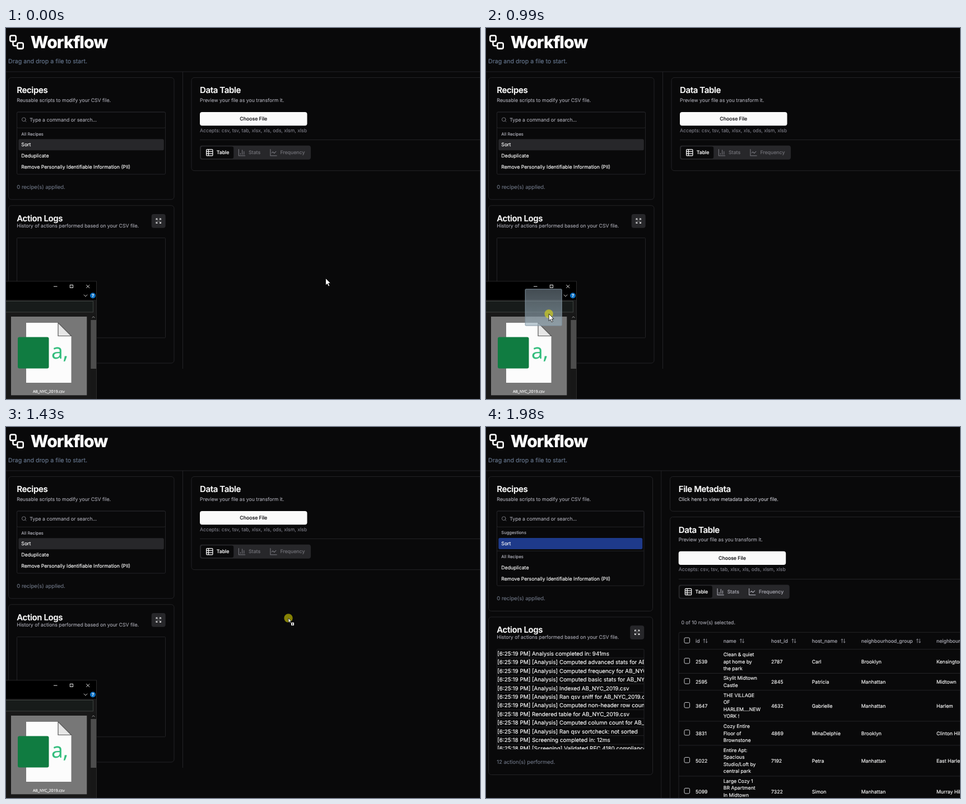
An HTML page for the animation above (2.69 s loop, 846 px wide and 662 px high).

```html
<!DOCTYPE html>
<html lang="en">
<head>
<meta charset="utf-8">
<title>Workflow</title>
<style>
html, body { margin: 0; width: 100%; height: 100%; overflow: hidden; background: #09090a; }
#stage { display: block; width: 846px; height: 662px; font-family: Inter, sans-serif; text-rendering: geometricPrecision; }
text { white-space: pre; stroke-width: .16px; }
</style>
</head>
<body>
<svg id="stage" viewBox="0 0 846 662"></svg>
<script>
const LOOP = 2690;
const LINE = '#232326', MUTED = '#a1a1aa', GRAY = '#6b7280', WHITE = '#fafafa', PANEL = '#27272a', BG = '#09090a';
const DIM = '#6c6c72', INK = '#18181b', SMALL = 8.71;

// Drawing helpers
const text = (x, y, s, size = SMALL, fill = WHITE, weight = 400, extra = '') =>
  `<text x="${x}" y="${y}" font-size="${size}" fill="${fill}" stroke="${fill}" font-weight="${weight}" ${extra}>${s}</text>`;
const title = (x, y, s) => text(x, y, s, 15, WHITE, 600, 'letter-spacing="-.375"');
const box = (x, y, right, bottom, r = 0, fill = 'none', stroke = 'none') =>
  `<rect x="${x}" y="${y}" width="${right - x}" height="${bottom - y}" rx="${r}" fill="${fill}" stroke="${stroke}"/>`;
const card = (x, y, right, bottom, r = 5) => box(x, y, right, bottom, r, 'none', LINE);
const path = (d, stroke = LINE, width = 1, fill = 'none') =>
  `<path d="${d}" stroke="${stroke}" stroke-width="${width}" fill="${fill}"/>`;
const hLine = (x, y, right) => path(`M${x} ${y}H${right}`);
const icon = (d, cx, cy, size, color) =>
  `<path d="${d}" transform="translate(${cx} ${cy}) scale(${size / 24}) translate(-12 -12)" fill="none" stroke="${color}"
    stroke-width="2" stroke-linecap="round" stroke-linejoin="round"/>`;
const group = (id, body) => `<g id="${id}">${body}</g>`;

const ICON = {
  flow: 'M5 3H9A2 2 0 0 1 11 5V9A2 2 0 0 1 9 11H5A2 2 0 0 1 3 9V5A2 2 0 0 1 5 3ZM7 11v4a2 2 0 0 0 2 2h4M15 13h4a2 2 0 0 1 2 2v4a2 2 0 0 1-2 2h-4a2 2 0 0 1-2-2v-4a2 2 0 0 1 2-2Z',
  table: 'M5 3h14a2 2 0 0 1 2 2v14a2 2 0 0 1-2 2H5a2 2 0 0 1-2-2V5a2 2 0 0 1 2-2ZM9 3v18M3 9h18M3 15h18',
  stats: 'M3 3v18h18M18 17V9M13 17V5M8 17v-3',
  freq: 'M3 3v18h18M19 9l-5 5-4-4-3 3',
  expand: 'M21 21l-6-6m6 6v-5m0 5h-5M3 16v5h5M3 21l6-6M21 8V3h-5M21 3l-6 6M3 8V3h5M3 3l6 6',
  search: 'M19 11A8 8 0 1 1 3 11A8 8 0 1 1 19 11M21 21l-4.3-4.3',
  sort: 'M21 16l-4 4-4-4M17 20V4M3 8l4-4 4 4M7 4v16',
  spin: 'M21 12a9 9 0 1 1-6.219-8.56'
};

const LOGS = [
  '[6:25:19 PM] Analysis completed in: 941ms',
  '[6:25:19 PM] [Analysis] Computed advanced stats for AB_NYC_2019.csv',
  '[6:25:19 PM] [Analysis] Computed frequency for AB_NYC_2019.csv',
  '[6:25:19 PM] [Analysis] Computed basic stats for AB_NYC_2019.csv',
  '[6:25:19 PM] [Analysis] Indexed AB_NYC_2019.csv',
  '[6:25:19 PM] [Analysis] Ran qsv sniff for AB_NYC_2019.csv',
  '[6:25:19 PM] [Analysis] Computed non-header row count for AB_NYC_2019.csv',
  '[6:25:18 PM] Rendered table for AB_NYC_2019.csv',
  '[6:25:18 PM] [Analysis] Computed column count for AB_NYC_2019.csv',
  '[6:25:18 PM] [Analysis] Ran qsv sortcheck: not sorted',
  '[6:25:18 PM] Screening completed in: 12ms',
  '[6:25:18 PM] [Screening] Validated RFC 4180 compliance'
];

const logRows = count => LOGS.slice(-count).map((s, i) =>
  text(.7, 11.4 + i * 15.4, s, 9.9, '#fff') + hLine(0, 15.4 * (i + 1), 270)).join('');
const logView = (id, y, width, height, count) =>
  `<svg id="${id}" x="19.5" y="${y}" width="${width}" height="${height}" overflow="hidden">${logRows(count)}</svg>`;

const search = right => card(19.5, 150, right, 178.3, 2) + icon(ICON.search, 32.2, 163.6, 10, '#8b8b92') +
  text(42.3, 167, 'Type a command or search...', SMALL, MUTED);

function tabs(x, y, dim, loading) {
  const grow = loading ? 20 : 0, mid = y + 12.5, base = y + 15.6;
  const frequency = x + 131.5 + 2 * grow;
  const tab = (symbol, left, gap, name, color) =>
    icon(symbol, left, mid, 15, color) + text(left + gap, base, name, SMALL, color, 500);
  return box(x, y, x + 198 + 3 * grow, y + 25, 4, PANEL) + box(x + 2, y + 1.8, x + 60.2 + grow, y + 23.2, 3, BG) +
    tab(ICON.table, x + 17.3, 12.4, 'Table', WHITE) +
    tab(ICON.stats, x + 75 + grow, 12, 'Stats', dim) +
    tab(ICON.freq, frequency, 11.9, 'Frequency', dim);
}

const chooser = (x, y, opacity = 1) =>
  `<g opacity="${opacity}">${box(x, y, x + 191.5, y + 24.3, 4, WHITE)}</g>` +
  text(x + 95.8, y + 15, 'Choose File', SMALL, INK, 500, 'text-anchor="middle"') +
  text(x, y + 35.5, 'Accepts: csv, tsv, tab, xlsx, xls, ods, xlsm, xlsb', SMALL, '#777780');

const dataHead = (x, y) => title(x, y, 'Data Table') +
  text(x, y + 15.4, 'Preview your file as you transform it.', SMALL, MUTED);

function logCard(right, top, bottom) {
  return card(4.5, top, right, bottom) + title(19.3, top + 28, 'Action Logs') +
    text(19.3, top + 39.2, 'History of actions performed based on your CSV file.', SMALL, MUTED) +
    box(right - 40.3, top + 15.2, right - 15.3, top + 40, 4, PANEL) +
    icon(ICON.expand, right - 27.8, top + 27.4, 11, WHITE) +
    card(19.5, top + 57.7, right - 15.5, top + 236, 1);
}

const header = icon(ICON.flow, 19, 25.2, 31.2, '#fff') +
  text(43.8, 35.8, 'Workflow', 30, '#fff', 800, 'letter-spacing="-.9"') +
  text(4, 63, 'Drag and drop a file to start.', 10.65, '#64748b') + hLine(0, 78, 846) +
  title(19.3, 116.4, 'Recipes') + text(19.3, 131.7, 'Reusable scripts to modify your CSV file.', SMALL, MUTED);

const spinner = (x, color) =>
  `<g transform="translate(${x} 222.3)"><g class="spin">${icon(ICON.spin, 0, 0, 15, color)}</g></g>`;

const before = path('M315.5 78V608') + card(4.5, 88.5, 300, 306) + card(19.5, 150, 284.5, 261, 2) + search(284.5) +
  text(27.3, 192, 'All Recipes', 7.5, MUTED, 500) + box(22.3, 198.2, 281.8, 218.3, 2.5, PANEL) +
  text(27.3, 211.3, 'Sort') + text(27.3, 231.2, 'Deduplicate') +
  text(27.3, 251, 'Remove Personally Identifiable Information (PII)') +
  text(19.3, 287, '0 recipe(s) applied.', 9.45, GRAY) + logCard(300, 316.8, 598) +
  card(331, 88.5, 860, 254.6) + dataHead(346, 116.4) + hLine(346, 199.5, 846) +
  group('idle', chooser(346, 150) + tabs(346, 209.8, DIM, false)) +
  group('loading', chooser(346, 150, .5) + tabs(346, 209.8, DIM, true) +
    spinner(411, WHITE) + spinner(487, '#85858b') + spinner(586.5, '#85858b') +
    [2, 3, 5].map(n => logView('log' + n, 374.5, 265, 178, n)).join(''));

const ROWS = [
  [418.5, 439.5, 2539, 'Clean &amp; quiet|apt home by|the park', 2787, 'Carl', 'Brooklyn', 'Kensington'],
  [454.7, 469.8, 2595, 'Skylit Midtown|Castle', 2845, 'Patricia', 'Manhattan', 'Midtown'],
  [497.5, 525, 3647, 'THE VILLAGE|OF|HARLEM....NEW|YORK !', 4632, 'Gabrielle', 'Manhattan', 'Harlem'],
  [546.5, 568, 3831, 'Cozy Entire|Floor of|Brownstone', 4869, 'MinaDelphie', 'Brooklyn', 'Clinton Hill'],
  [595.5, 623, 5022, 'Entire Apt:|Spacious|Studio/Loft by|central park', 7192, 'Petra', 'Manhattan', 'East Harlem'],
  [650.5, 678, 5099, 'Large Cozy 1|BR Apartment|In Midtown|East', 7322, 'Simon', 'Manhattan', 'Murray Hill']
];
const COLS = [['id', 374, 391.5], ['name', 423.7, 457], ['host_id', 509, 549.5], ['host_name', 581.7, 637.5],
  ['neighbourhood_group', 669.7, 772], ['neighbourhood', 804, 870]];

const check = y => box(354, y - 5, 363.5, y + 4.5, 2, 'none', '#c9c9cc');
function table() {
  let out = card(344, 366.3, 860, 700, 3) + hLine(344, 396.6, 846) + check(381);
  for (const [name, x, arrow] of COLS)
    out += text(x, 385, name, 8.7, MUTED, 500) + icon(ICON.sort, arrow, 381.6, 10, MUTED);
  for (const [mid, bottom, id, name, ...rest] of ROWS) {
    const lines = name.split('|');
    out += check(mid - 1) + hLine(344, bottom, 846) + text(374, mid + 3, id);
    lines.forEach((s, i) => out += text(423.7, mid + 3 + (i - (lines.length - 1) / 2) * 12.5, s));
    rest.forEach((s, i) => out += text(COLS[i + 2][1], mid + 3, s));
  }
  return out;
}

const after = path('M312.7 78V662') + card(4.5, 88.5, 297.5, 328.5) + card(19.5, 150, 282, 283.2, 2) + search(282) +
  text(27.3, 191.3, 'Suggestions', 7.5, MUTED, 500) + box(22.3, 198, 279.2, 218, 2.5, '#1e3a8a') +
  text(27.3, 211, 'Sort') + hLine(20, 221.2, 282) + text(27.3, 234.2, 'All Recipes', 7.5, MUTED, 500) +
  text(27.3, 253.8, 'Deduplicate') + text(27.3, 273.5, 'Remove Personally Identifiable Information (PII)') +
  text(19.3, 309.4, '0 recipe(s) applied.', 9.45, GRAY) + logCard(297.5, 339, 620.5) +
  logView('logAll', 396.7, 262.5, 178.3, 12) + text(19.3, 601.3, '12 action(s) performed.', 9.45, GRAY) +
  card(328.5, 88.5, 860, 150.3) + title(343.7, 116.4, 'File Metadata') +
  text(343.7, 131.7, 'Click here to view metadata about your file.', SMALL, '#bdbdc4') +
  card(328.5, 160.5, 860, 700) + dataHead(343.7, 188.5) + chooser(343.7, 221.8) +
  hLine(344, 271.5, 846) + tabs(343.7, 281.5, MUTED, false) +
  text(348.4, 352.2, '0 of 10 row(s) selected.', SMALL, MUTED) + table();

const explorer = box(-2, 452, 161.5, 664, 0, '#191919', '#2b2b2b') + box(0, 452.5, 161, 485, 0, '#000') +
  path('M85 461.2H91.5M143.3 458.3l5.8 5.8m0-5.8l-5.8 5.8', '#ddd') + box(114.3, 458.5, 119.5, 463.5, 0, 'none', '#ddd') +
  path('M138.7 475.8l3.3 3.3 3.3-3.3', '#ccc') + '<circle cx="155" cy="477.5" r="5" fill="#0b6fc2"/>' +
  text(155, 480.2, '?', 7.5, '#fff', 700, 'text-anchor="middle"') +
  box(-2, 487.5, 155.5, 507, 0, '#171b1a', '#3c413f') + box(151, 510, 161, 662, 0, '#171717') +
  box(151.3, 521, 161, 608, 0, '#4d4d4d') + path('M153.6 517.2l2.4-2.4 2.4 2.4', '#999') +
  box(9, 515, 144.3, 655.3, 0, '#777') + path('M36 526H93L116.5 549.5V633H36Z', 'none', 0, '#fcfcfc') +
  path('M93 526V549.5H116.5Z', '#585858', 1.2, '#e6e6e6') + box(21, 551.5, 76.5, 607.5, 3, '#107c41') +
  text(81, 589.8, 'a,', 37.5, '#33bd7d', 400, 'font-family="Open Sans, sans-serif"') +
  text(76.3, 651, 'AB_NYC_2019.csv', 7, '#fff', 400, 'font-family="Open Sans, sans-serif" text-anchor="middle"');

const ARROW = 'M0 0V12.6L2.9 9.9L5 14.6L7.2 13.6L5.1 9.1H9Z';
const pointer = group('ghost', box(-42, -44, 23, 21, 1, 'url(#glass)', '#8194a2')) +
  '<circle id="press" r="7.7" fill="#f8f000" opacity=".52"/>' +
  group('arrow', path(ARROW, '#000', .8, '#fff')) +
  group('drop', `<g transform="scale(.62)">${path(ARROW, '#111', 1.2, '#fff')}</g>` +
    box(5, 8, 10, 13, 0, '#fff') + path('M6.2 10.5h2.6M7.5 9.2v2.6', '#111'));

const stage = document.getElementById('stage');
stage.innerHTML = `<defs><linearGradient id="glass" x2="0" y2="1"><stop stop-color="#8799a6" stop-opacity=".5"/>
  <stop offset="1" stop-color="#9ab0bd" stop-opacity=".65"/></linearGradient></defs>` +
  header + group('before', before) + group('after', after) + group('explorer', explorer) + group('pointer', pointer);

// Pointer legs: start, end, from, to, x easing, y easing
const linear = p => p, inOut = p => p * p * (3 - 2 * p);
const slowIn = p => p ** 3, quickIn = p => p ** 1.4, softOut = p => 1 - (1 - p) ** 2, slowOut = p => 1 - (1 - p) ** 3;
const LEGS = [
  [30, 290, [570.5, 446.5], [46.5, 582], inOut, inOut],
  [425, 560, [46.5, 582], [56.5, 576], inOut, inOut],
  [740, 990, [56.5, 576], [111, 511], slowIn, slowIn],
  [990, 1080, [111, 511], [214, 424], linear, linear],
  [1080, 1260, [214, 424], [444, 345.5], linear, softOut],
  [1260, 1430, [444, 345.5], [504, 341], slowOut, slowOut],
  [1570, 1770, [504, 341], [758.5, 178], quickIn, quickIn],
  [1800, 1860, [758.5, 178], [880, 100], linear, linear]
];

function pointerAt(t) {
  const [start, end, a, b, ex, ey] = LEGS.filter(leg => leg[0] <= t).pop() || LEGS[0];
  const p = Math.min(1, Math.max(0, (t - start) / (end - start)));
  return [a[0] + (b[0] - a[0]) * ex(p), a[1] + (b[1] - a[1]) * ey(p)];
}

const parts = Object.fromEntries([...stage.querySelectorAll('[id]')].map(el => [el.id, el]));
const spinners = stage.querySelectorAll('.spin');
const show = (id, on) => parts[id].setAttribute('display', on ? 'inline' : 'none');

function draw(t) {
  const [x, y] = pointerAt(t);
  const held = t >= 740 && t < 1580, done = t >= 1980, loading = t >= 1670;
  const inWindow = x < 161 && y > 452, dragging = held && !inWindow;
  parts.pointer.setAttribute('transform', `translate(${x.toFixed(2)} ${y.toFixed(2)})`);
  show('pointer', t < 1860);
  show('press', held);
  show('ghost', held && inWindow && x > 70);
  show('drop', dragging);
  show('arrow', !dragging);
  show('before', !done);
  show('after', done);
  show('explorer', !done);
  show('idle', !loading);
  show('loading', loading);
  show('log2', t < 1840);
  show('log3', t >= 1840 && t < 1900);
  show('log5', t >= 1900);
  for (const s of spinners) s.setAttribute('transform', `rotate(${((t - 1670) * .36).toFixed(1)})`);
}

const origin = performance.now();
function tick() {
  draw((performance.now() - origin) % LOOP);
  requestAnimationFrame(tick);
}
tick();
</script>
</body>
</html>
```
